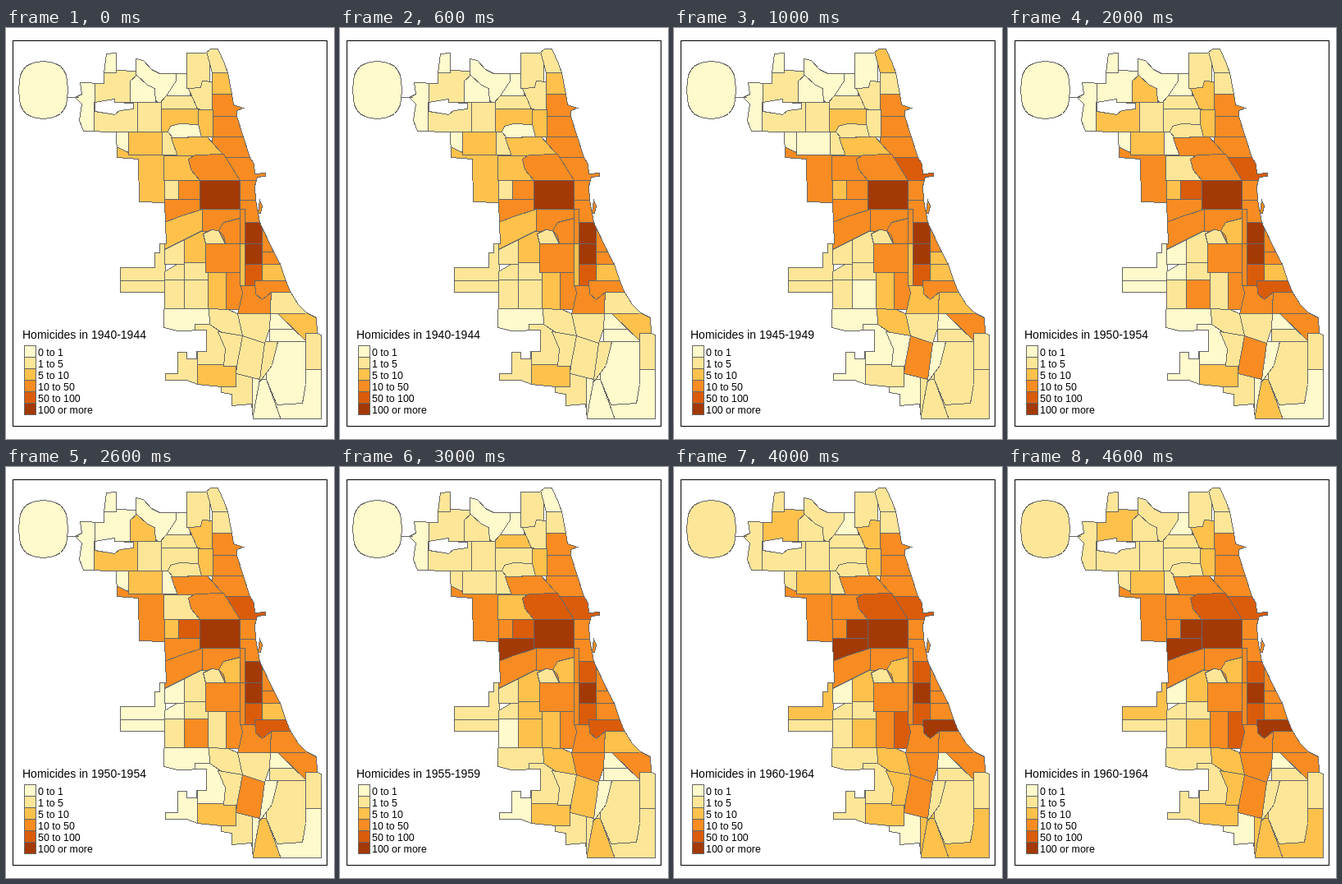
Animation of 400 by 500 pixels, one loop 5000 ms. Source, as an HTML page:

```html
<!DOCTYPE html>
<html lang="en">
<head>
<meta charset="utf-8">
<title>Homicides by area</title>
<style>
html, body { margin: 0; width: 100%; height: 100%; overflow: hidden; background: #fff; }
svg { display: block; }
polygon, path, rect { stroke: #666; stroke-width: 1; shape-rendering: crispEdges; }
text { font-family: "Liberation Sans", Arial, sans-serif; font-size: 12.4px; fill: #000; }
#title { font-size: 14px; }
</style>
</head>
<body>
<svg id="map" width="400" height="500" viewBox="0 0 400 500">
  <clipPath id="land"></clipPath>
</svg>
<script>
const svg = document.getElementById('map');
const colors = ['#fffacc', '#fee698', '#fec14c', '#f88c22', '#da5c0a', '#a33904'];
const labels = ['0 to 1', '1 to 5', '5 to 10', '10 to 50', '50 to 100', '100 or more'];
const period = 1000, steps = 5;
const areas = [];

function add(parent, tag, attrs, text = '') {
  const el = document.createElementNS('http://www.w3.org/2000/svg', tag);
  for (const key in attrs) el.setAttribute(key, attrs[key]);
  el.textContent = text;
  return parent.appendChild(el);
}

add(svg, 'rect', { x: 8.5, y: 15.5, width: 383, height: 469, fill: '#fff', style: 'stroke:#000' });
const base = add(svg, 'g', { transform: 'translate(.5 .5)' });
const city = add(base, 'g', { 'clip-path': 'url(#land)' });

// levels: one colour class per period; later shapes cover earlier ones
function shape(levels, points, parent = city) {
  areas.push({ el: add(parent, 'polygon', { points }), levels });
}

function box(levels, l, t, r, b) {
  shape(levels, `${l},${t} ${r},${t} ${r},${b} ${l},${b}`);
}

// neighbouring boxes between the given lines, row by row
function cells(xs, ys, ...levels) {
  for (let j = 1; j < ys.length; j++)
    for (let i = 1; i < xs.length; i++)
      box(levels.shift(), xs[i - 1], ys[j - 1], xs[i], ys[j]);
}

const coast = '243,30 249,25 258,25 266,43 270,54 275,80 277,93 289,97 281,100 281,107 289,132 297,157 ' +
  '302,165 303,177 316,176 316,180 306,181 303,192 304,209 309,236 325,270 334,287 340,305 ' +
  '346,320 356,336 366,346 378,352 379,371 384,373 384,475 ';
const inland = '301,475 299,457 275,459 275,445 262,443 262,436 233,433 220,428 194,428 194,420 209,420 209,394 ' +
  '220,394 220,402 232,402 232,393 244,393 244,367 209,368 192,364 193,321 139,321 139,291 181,291 ' +
  '181,273 187,273 187,262 195,262 193,212 162,211 161,159 135,157 134,126 94,125 89,112 92,92 84,84 ' +
  '92,80 90,66 119,67 119,54 122,31 134,30 134,51 158,52 158,37 167,39 177,50 187,55 220,55 220,30';
add(document.getElementById('land'), 'polygon', { points: coast + inland });

// north side
box('00001', 80, 60, 120, 127);
box('11012', 108, 50, 158, 90);
box('00011', 118, 25, 134, 54);
box('00000', 195, 55, 224, 83);
box('11121', 185, 82, 235, 98);
shape('00001', '158,30 187,55 207,55 207,64 195,82 186,92 158,60');
shape('00211', '151,64 159,57 172,69 181,73 182,92 151,92');
cells([107, 160, 189], [90, 126], '11211', '11111');
box('22111', 189, 98, 234, 126);
box('10111', 220, 28, 248, 73);
shape('12101', '243,24 275,24 275,54 251,54');
cells([251, 300], [54, 80, 107, 132, 158], '21111', '33333', '33333', '33333');
shape('11212', '222,73 237,72 239,64 251,65 251,101 233,98');
box('21222', 234, 99, 252, 132);

// west side
box('23333', 130, 144, 193, 212);
cells([149, 190, 210], [126, 154], '20212', '11011');
shape('00011', '134,126 149,126 149,151 134,144');
shape('22333', '201,133 245,132 268,158 209,156');
shape('01111', '197,126 200,119 211,116 234,117 238,132 203,133');
box('23123', 192, 155, 236, 185);
box('34444', 262, 157, 320, 185);
shape('33344', '222,159 230,154 265,153 285,185 236,185 225,172');
cells([193, 210, 236], [185, 208], '12233', '33445');

// south-west side
cells([130, 194], [255, 307, 322], '11012', '11011');
cells([193, 217, 243], [245, 287], '11010', '21122');
shape('11011', '193,296 208,287 217,287 217,306 193,306');
box('11121', 217, 285, 246, 306);
cells([193, 217, 246], [306, 341], '11101', '10322');
box('33333', 243, 247, 286, 297);
cells([246, 268, 292], [297, 342], '22123', '33334');
shape('23333', '193,236 239,208 239,246 193,269');
shape('33355', '193,208 239,208 239,220 211,229 193,236');

// centre and lake front
box('33333', 239, 220, 286, 247);
box('55555', 236, 185, 286, 220);
shape('11111', '240,250 250,245 259,246 267,262 243,262');
shape('33222', '259,246 265,236 285,231 285,262 267,262 265,252');
cells([285, 320], [185, 209, 236], '33333', '33333');
cells([285, 291], [220, 262, 313], '33333', '22333');
cells([312, 345], [246, 272, 287, 307], '33333', '32333', '22233');
cells([291, 312], [236, 262, 287, 313], '55544', '55555', '44444');

// south side
box('00011', 190, 341, 248, 370);
cells([321, 366], [340, 366, 381], '00000', '01101');
box('12323', 322, 320, 370, 347);
shape('23333', '331,347 400,346 379,371 366,381');
shape('32333', '286,313 323,313 322,348 282,348 288,322');
shape('33445', '303,307 350,307 350,321 323,321 312,330 304,323');
box('10011', 230, 360, 268, 411);
box('10001', 190, 390, 233, 435);
shape('12122', '247,341 270,342 282,347 288,374 267,373 248,360');
box('10110', 260, 420, 312, 476);
box('21222', 233, 409, 280, 436);
shape('10112', '258,369 288,374 281,411 265,411 267,390');
box('01012', 300, 381, 390, 476);
shape('01111', '316,381 366,381 365,433 361,456 330,458 317,427');
box('11111', 365, 371, 385, 415);
shape('01222', '309,427 317,427 335,476 300,476');
shape('10001', '313,381 331,381 324,410 309,430');
shape('11133', '282,347 322,347 321,365 315,383 288,374');
shape('13323', '288,374 315,383 309,427 280,420 281,411');

add(base, 'polygon', { points: coast + inland, fill: 'none' });
add(base, 'polygon', { points: '108,90 132,86 132,90 155,91 155,98 138,100 132,105 108,101', fill: '#fff' });
shape('33333', '309,209 312,216 310,225 307,225', base);

// airport: a rounded block joined by a thin road
const airport = Array.from({ length: 28 }, (_, i) => {
  const a = i / 28 * 2 * Math.PI;
  const bend = v => Math.sign(v) * Math.abs(v) ** .8;
  return `${Math.round(45 + 30 * bend(Math.cos(a)))},${Math.round(75 + 35 * bend(Math.sin(a)))}`;
});
shape('00001', airport.join(' '), base);
add(base, 'path', { d: 'M73 84H88', fill: 'none' });

// legend
const title = add(svg, 'text', { id: 'title', x: 20, y: 378 });
labels.forEach((label, i) => {
  const y = 386 + i * 14;
  add(svg, 'rect', { x: 22.5, y: y + .5, width: 14, height: 14, fill: colors[i] });
  add(svg, 'text', { x: 39, y: y + 13 }, label);
});

let shown = -1;
function frame(now) {
  const step = Math.floor(now / period) % steps;
  if (step !== shown) {
    shown = step;
    const year = 1940 + step * 5;
    title.textContent = `Homicides in ${year}-${year + 4}`;
    for (const { el, levels } of areas) el.setAttribute('fill', colors[levels[step]]);
  }
  requestAnimationFrame(frame);
}
frame(performance.now());
</script>
</body>
</html>
```
